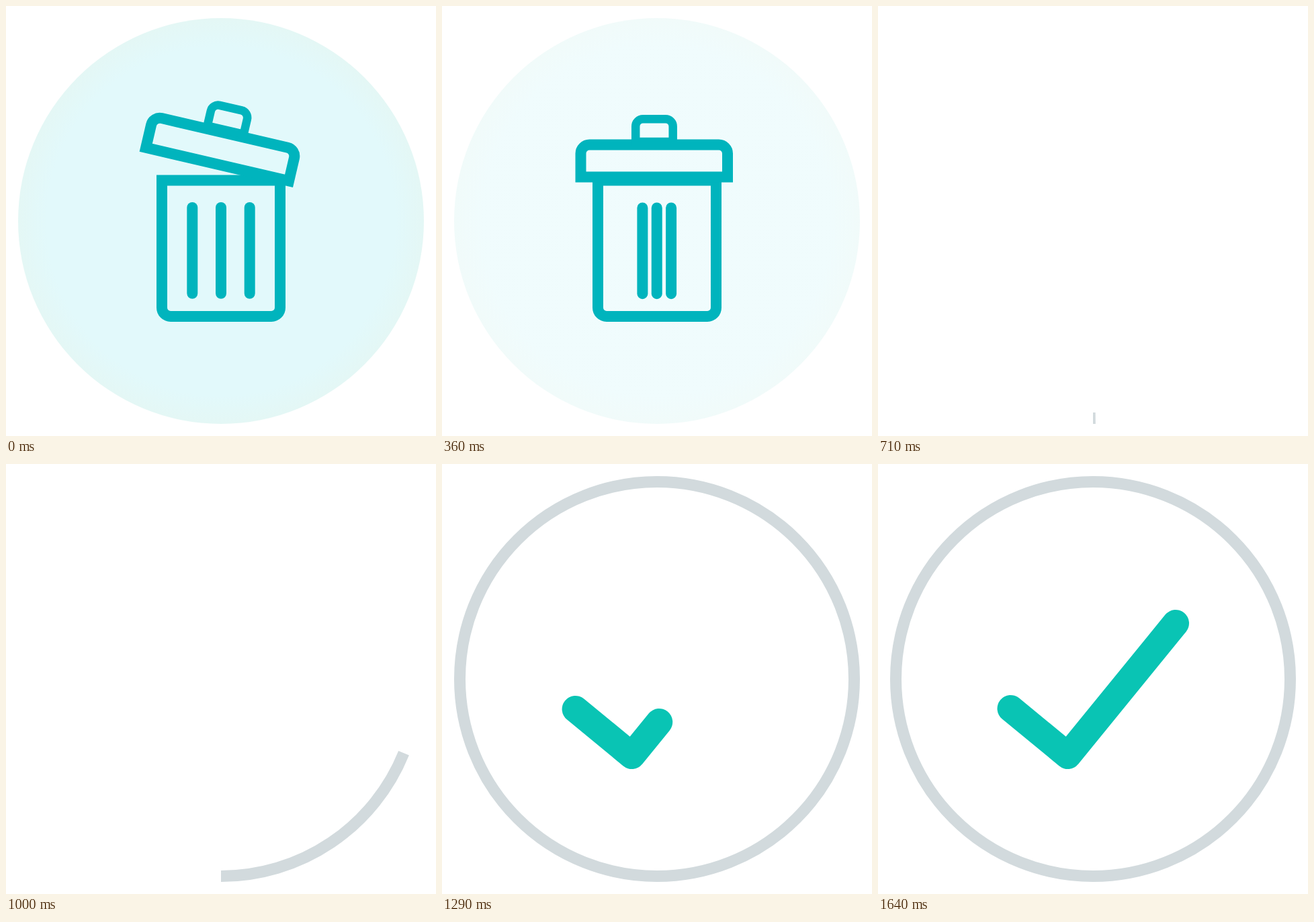
Animation, 640 px wide and 640 px high, one loop 2430 ms. Source, as an HTML page:

```html
<!DOCTYPE html>
<html lang="en">
<head>
<meta charset="utf-8">
<title>Deleted</title>
<style>
  html, body { margin: 0; width: 100%; height: 100%; overflow: hidden; background: #fff; }
  svg { display: block; width: 100vw; height: 100vh; }
  path, line { fill: none; }
  #bin { stroke: #00b4bd; stroke-width: 16; }
  #bars { stroke-linecap: round; }
  #handle { stroke-width: 12.5; }
  #ring { stroke: #d2dadd; stroke-width: 17; }
  #check { stroke: #09c4b4; stroke-width: 40; stroke-linecap: round; stroke-linejoin: round; }
</style>
</head>
<body>
<svg viewBox="0 0 640 640">
  <defs>
    <radialGradient id="tint">
      <stop offset=".86" stop-color="#e2f9fb"/>
      <stop offset="1" stop-color="#e4f7f5"/>
    </radialGradient>
  </defs>
  <circle id="disc" cx="320" cy="320" r="302" fill="url(#tint)"/>
  <g id="bin">
    <path d="M232 259.5H408V449a13 13 0 0 1-13 13H245a13 13 0 0 1-13-13Z"/>
    <g id="bars">
      <line x1="320" y1="300" x2="320" y2="427.8"/>
      <line x1="320" y1="300" x2="320" y2="427.8"/>
      <line x1="320" y1="300" x2="320" y2="427.8"/>
    </g>
    <g id="lid">
      <path d="M206.5 254.5V219.5a13 13 0 0 1 13-13H412a13 13 0 0 1 13 13V254.5Z"/>
      <path id="handle" d="M288.2 202V179.2a11 11 0 0 1 11-11H332.7a11 11 0 0 1 11 11V202Z"/>
    </g>
  </g>
  <path id="ring" pathLength="1" d="M320 613.5A293.5 293.5 0 0 0 320 26.5A293.5 293.5 0 0 0 320 613.5"/>
  <path id="check" pathLength="1" d="M197.5 364L282.5 434L443 237"/>
</svg>
<script>
  const LOOP = 2430, STEP = 500 / 7, LAST = 23;
  const $ = id => document.getElementById(id);
  const span = (x, a, b) => Math.min(1, Math.max(0, (x - a) / (b - a)));
  const smooth = u => u * u * (3 - 2 * u);

  // Cubic bezier ease with flat ends: (x1, 0, x2, 1)
  function ease(u, x1, x2) {
    let lo = 0, hi = 1;
    for (let i = 0; i < 30; i++) {
      const s = (lo + hi) / 2, r = 1 - s;
      if (3 * r * r * s * x1 + 3 * r * s * s * x2 + s * s * s < u) lo = s; else hi = s;
    }
    return smooth(lo);
  }

  function trim(el, from, to) {
    el.style.visibility = to > from ? 'visible' : 'hidden';
    el.setAttribute('stroke-dasharray', `${to - from} 2`);
    el.setAttribute('stroke-dashoffset', -from);
  }

  function draw(k) {
    const binOn = k < 8;
    $('bin').style.visibility = binOn ? 'visible' : 'hidden';
    $('disc').style.opacity = binOn ? 1 - 0.96 * span(k, 3, 7) : 0;

    const tilt = 13.1 * (1 - smooth(span(k, 0, 3.9)));
    $('lid').setAttribute('transform', `rotate(${tilt} 397.3 240.1)`);

    const merge = smooth(span(k, 3, 7));
    [...$('bars').children].forEach((bar, i) => {
      const x = (i - 1) * 42.7 * (1 - merge) - 0.5 * merge;
      bar.setAttribute('transform', `translate(${x} ${0.8 * merge})`);
    });

    trim($('ring'), 0, 1.002 * ease(span(k, 9.4, 18), 0.913, 0.699));
    const tip = 1 - Math.pow(1 - span(k, 16, LAST), 1.94);
    trim($('check'), tip && 0.0075 * (1 - tip), tip);
  }

  const start = performance.now();
  function tick() {
    const t = (performance.now() - start) % LOOP;
    draw(Math.min(LAST, Math.floor((t + 5) / STEP)));
    requestAnimationFrame(tick);
  }
  tick();
</script>
</body>
</html>
```
